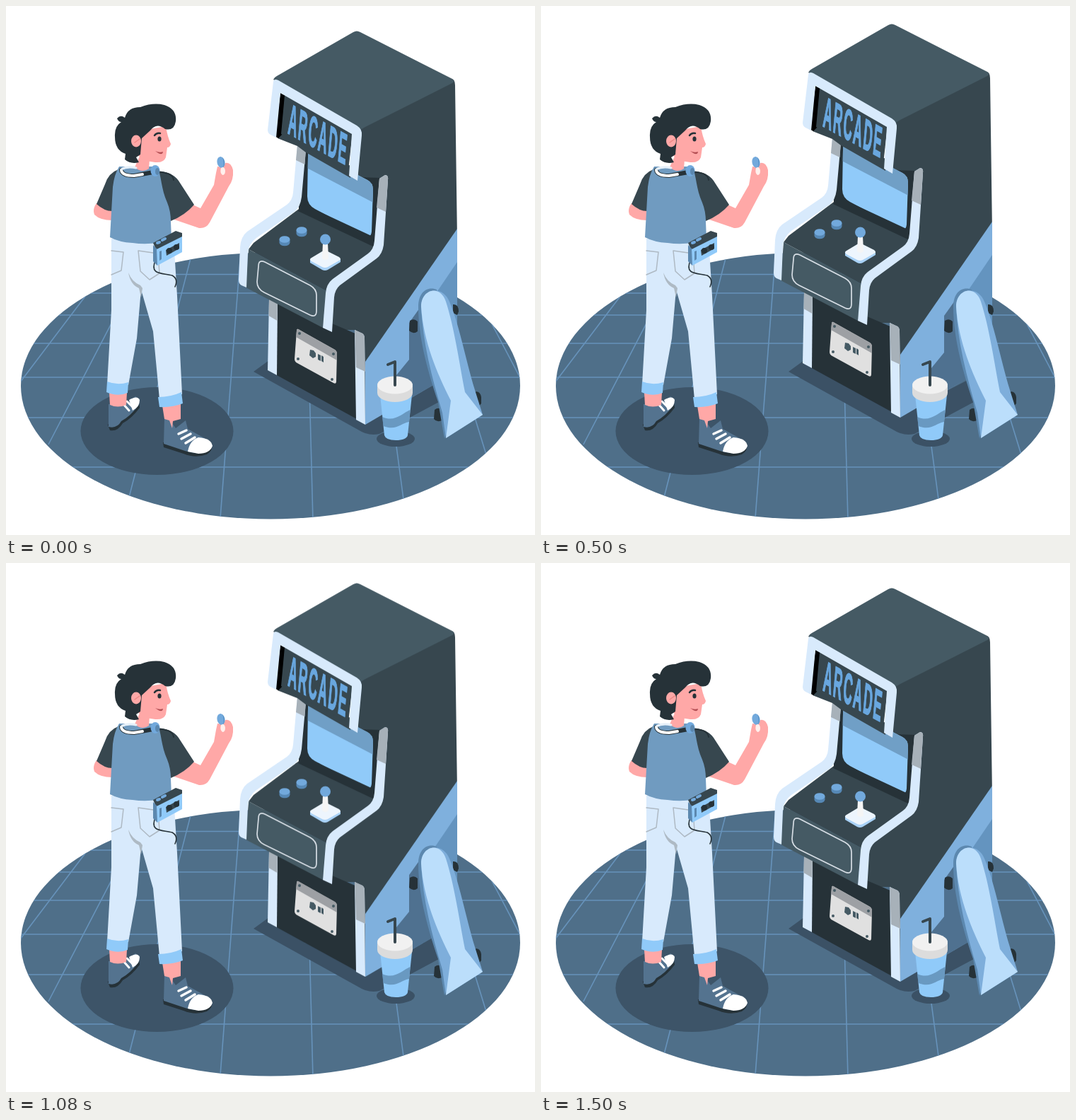
Write an HTML page without scripts that moves like this. It is 748x748 px and loops after 1540 ms.

```html
<!DOCTYPE html>
<html lang="en">
<head>
<meta charset="utf-8">
<title>Arcade</title>
<style>
  html, body { margin: 0; width: 100%; height: 100%; overflow: hidden; background: #fff; }
  svg { display: block; width: 100vw; height: 100vh; }
  .navy { fill: #263238; }
  .dark { fill: #37474f; }
  .slate { fill: #455a64; }
  .ice { fill: #d8eafc; }
  .sky { fill: #90caf9; }
  .blue { fill: #72a9dc; }
  .steel { fill: #5c88af; }
  .skin { fill: #ffa8a7; }
  .grey { fill: #a7b1b9; }
  .white { fill: #fff; }
  .line { fill: none; stroke-linecap: round; stroke-linejoin: round; }
  .grid { fill: none; stroke: #6793bb; stroke-width: 1.6; }
  .sign { font: 700 58px "Liberation Sans", Arial, sans-serif; letter-spacing: 6px; fill: #69a7df; stroke: #69a7df; stroke-width: 2; }
  .cabinet { animation: hover 1540ms linear infinite; }
  @keyframes hover {
    0% { transform: translateY(0); }
    46.25% { transform: translateY(-14.25px); }
    95% { transform: translateY(.75px); }
    97.4%, 100% { transform: translateY(0); }
  }
</style>
</head>
<body>
<svg viewBox="0 0 748 748" xmlns="http://www.w3.org/2000/svg">
  <defs>
    <clipPath id="floor"><ellipse cx="374" cy="537" rx="353" ry="188.500"/></clipPath>
    <clipPath id="screen"><path id="glass" d="M427 213Q427 203 435 207L511 246Q519 250 519 260L517 319Q516 329 508 325L437 287Q426 281 426 269Z"/></clipPath>
    <g id="button">
      <path fill="#5688b5" d="M-7.500 0V4.500A7.500 4.800 0 0 0 7.500 4.500V0Z"/>
      <ellipse class="blue" rx="7.500" ry="4.800"/>
    </g>
  </defs>

  <!-- Floor -->
  <g clip-path="url(#floor)">
    <path fill="#4f6f89" d="M0 340H748V748H0Z"/>
    <path class="grid" d="M0 379.500H748M0 406H748M0 437H748M0 477H748M0 525H748M0 582H748M0 652H748"/>
    <path class="grid" d="M190 370L60 620M120 400L20 532M261 357L170 710M332 345L303 724M424 345L434 728M515 345L563 705M590 345L690 670M640 360L745 560"/>
    <path fill="#3b5165" d="M350 517L372 501L508 578L640 510V545L528 605Q515 608 503 602Z"/>
    <ellipse cx="213.500" cy="601" rx="108" ry="62" fill="#3d5468"/>
    <ellipse cx="551" cy="612" rx="27" ry="11" fill="#3b5165"/>
  </g>

  <!-- Arcade machine -->
  <g class="cabinet">
    <path class="dark" d="M500 172L630 103Q635 104 635 112L638 330V516L508 592L495 585V458H460L448 455L465 388L520 345L528 243L497 247Z"/>
    <path fill="#7fb0dd" d="M638 315V516L508 592V503Z"/>
    <path fill="#6494bf" d="M638 362L602 415L596 540L638 516Z"/>
    <path fill="#4f7190" d="M590 420L570 448V500L552 522V566L622 526L608 432Z"/>
    <path class="slate" d="M378 104Q379 101 383 99L491 37Q496 34 501 37L631 103Q636 106 631 109L510 170Q502 174 498 178Z"/>

    <path class="navy" d="M382 415L496 464V584L381 521Z"/>
    <path class="ice" d="M372 415L384 421L383 522L370 515Z"/>
    <path class="grey" d="M372 414L384 420L383.500 445L371.500 438Z"/>
    <path class="ice" d="M493 458L504 463Q507 465 507 470L508 592L495 585Z"/>
    <path class="grey" d="M493 458L504 463Q507 465 507 470L508 517L495 511Z"/>

    <path fill="#e0e0e0" d="M411 459Q411 455 415 458L465 486Q468 488 468 492L467 531Q467 535 463 533L412 505Q408 503 408 499Z"/>
    <path fill="#9da0a4" d="M411 459Q411 455 415 458L465 486Q468 488 468 492V501L410 468Z"/>
    <g class="slate">
      <circle cx="415" cy="463" r="2"/><circle cx="463" cy="492" r="2"/>
      <circle cx="413" cy="499" r="2"/><circle cx="461" cy="528" r="2"/>
      <path d="M430 486L435 487L438 491V496L434 498L429 494ZM441 492L445 494V502L441 500ZM446 494L449 496V504L446 502Z"/>
    </g>

    <path class="navy" d="M413 200L497 242L530 243L521 336L414 288Z"/>
    <use href="#glass" class="sky"/>
    <path clip-path="url(#screen)" fill="#709fc6" d="M420 195H525V281L420 226Z"/>
    <path class="dark" d="M414 287L521 336L522 346L465 388L453 403L343 344L350 335Z"/>
    <path class="slate" d="M343 344L453 403L448 455L339 398Z"/>
    <path class="navy" d="M418 279L523 328L521 341L413 290Z"/>
    <path class="line" stroke="#d7dee5" stroke-width="1.700" d="M357 368Q357 358 366 362L430 395Q439 400 439 409V431Q439 441 430 437L365 405Q355 400 355 390Z"/>

    <path class="ice" d="M412 196L424 203L418 270Q416 285 408 291L354 328Q343 336 342 350L340 398L333 395Q329 393 329 387L331 341Q332 326 341 319L397 281Q405 275 406 264Z"/>
    <path class="grey" d="M412 196L424 203L422.500 224L410 218Z"/>
    <path class="ice" d="M528 244L536 239Q541 239 540 246L534 338Q532 351 524 357L472 395Q465 401 464 412L461 461L448 455L452 406Q453 393 462 386L512 350Q520 344 521 332Z"/>
    <path class="grey" d="M528 244L536 239Q541 239 540 246L537 291L524 285Z"/>

    <use href="#button" x="394" y="330"/>
    <use href="#button" x="418" y="317"/>
    <path fill="#a9d2f7" d="M430 358L473 358V362L455 373Q451 375 447 373L430 363Z"/>
    <path fill="#edf5fd" d="M432 356L447 347Q451 345 455 347L471 355Q475 358 471 360L455 369Q451 371 447 369L432 361Q428 358 432 356Z"/>
    <path fill="#f5f5f5" d="M448 335H455L456 357Q452 361 447 357Z"/>
    <circle class="blue" cx="451.500" cy="330" r="7.500"/>

    <path class="dark" d="M384 187L391 178L487 226V243L424 207L412 198Z"/>
    <path d="M388 123L396 127L391 181L385 187L380 184Z"/>
    <path class="dark" d="M394 126L490 180L484 232L389 181Z"/>
    <path class="ice" d="M378 107Q379 102 385 105L496 169Q504 174 503 183L497 247L485 240L489 181L388 123L382 186L374 182Q370 180 370 175Z"/>
    <text class="sign" transform="matrix(.295 .162 -.09 1.030 398 179.500)">ARCADE</text>
  </g>

  <!-- Skateboard -->
  <g>
    <path class="navy" d="M632 422Q640 421 640 432L638 437L632 434ZM571 445Q577 441 582 446V460Q576 465 570 459ZM606 571Q612 566 618 572V585Q610 590 605 584ZM662 546Q670 543 672 553V562Q668 568 662 565Z"/>
    <path class="steel" d="M583 426C583 399 601 397 609 401L640 535L620 612L611 560C594 510 583 465 583 426Z"/>
    <path fill="#7eaedb" d="M587 425C587 400 617 393 627 418C640 447 650 500 663 543L674 578L622 611L617 575C602 525 589 475 587 425Z"/>
    <path fill="#bbdefb" d="M587 425C587 400 614 393 622 418C634 455 641 505 649 546L674 578L622 611L629 558C610 520 590 475 587 425Z"/>
  </g>

  <!-- Drink -->
  <g>
    <path class="sky" d="M529 550H574L568 607Q566 614 551 614Q537 614 535 607Z"/>
    <path class="steel" d="M532 581C550 589 560 576 571.500 571L570 588C558 590 552 601 533.500 594Z" opacity=".75"/>
    <path fill="#dcdcdc" d="M525 537H575V547A25 13 0 0 1 525 547Z"/>
    <ellipse cx="550" cy="536" rx="25" ry="12.500" fill="#f1f1f1"/>
    <path class="line" stroke="#37474f" stroke-width="4" d="M550 536V503L540 507"/>
  </g>

  <!-- Shoes and ankles -->
  <g>
    <path class="navy" d="M144 592L188 560L189 568Q178 583 165 590Q158 602 147 600Z"/>
    <path fill="#54738f" d="M145 563L169 562L183 552Q189 556 188 564Q176 580 163 587Q157 598 145 595Z"/>
    <path class="white" d="M174 557Q186 550 189 557Q189 567 179 572Z"/>
    <path class="line" stroke="#fff" stroke-width="3" d="M166 563L174 572M171 559L179 567"/>
    <path class="skin" d="M146 547H171L170 564Q158 569 147 564Z"/>
    <path class="navy" d="M222 617L291 618Q293 629 284 634Q268 640 251 633L223 624Z"/>
    <path fill="#54738f" d="M224 583L230 583L240 597L254 586L257 598L286 614Q293 628 280 631Q266 634 253 629L223 619Z"/>
    <path class="white" d="M272 610Q290 611 292 622Q288 633 272 633L257 630Q260 614 272 610Z"/>
    <path class="line" stroke="#fff" stroke-width="3.500" d="M244 605L255 600M248 612L261 605M254 618L267 610"/>
    <path class="skin" d="M221 565L247 561V584L236 587L235 597L231 586L224 584Z"/>
  </g>

  <!-- Jeans -->
  <g>
    <path class="ice" d="M149 329H237L242 410L249 549L217 556L208 460L191 401L185 470L173 536L143 535L149 430Z"/>
    <path class="sky" d="M143 531Q158 537 173 532L172 547Q158 553 142 546ZM215 553Q233 553 248 546L250 562Q235 568 217 567Z"/>
    <path fill="#aebac4" d="M173 377Q178 390 190 395L193 399L191 412L188 399Q176 394 173 377Z"/>
    <path class="line" stroke="#aeb9c3" stroke-width="1.500" d="M149 346L166 348L163 374L149 380M187 346L190 375L203 387L217 378L215 350L187 346"/>
  </g>

  <!-- Arms and torso -->
  <g>
    <path class="skin" d="M128 279Q122 287 125 295Q133 303 150 303V283Z"/>
    <path class="skin" d="M235 296L264 281L275 286L294 253L297 236L299 227Q308 229 310 222Q318 220 321 232Q322 246 315 255L288 306Q283 315 273 314L235 301Z"/>
    <path class="dark" d="M159 231Q145 236 140 252L128 280Q139 290 150 290ZM212 233Q235 234 244 247L266 281Q253 296 233 304Z"/>
    <path fill="#709bc0" d="M160 227H214C220 240 219 258 228 278Q233 290 233 305L234 330Q207 339 179 335Q160 334 147 327L151 256Q153 238 160 227Z"/>
    <ellipse class="blue" cx="304" cy="221" rx="5.500" ry="8" transform="rotate(-12 304 221)"/>
    <path fill="#508abf" d="M306 213.500Q311 220 307 229Q309 221 306 213.500Z"/>
    <path fill="#fff0ed" d="M304 229Q309 226 310 233Q310 239 306 239Q302 236 304 229Z"/>
  </g>

  <!-- Head -->
  <g>
    <path class="skin" d="M191 208L203 217L202 230Q192 237 182 228Z"/>
    <path class="skin" d="M187 177L226 170Q228 184 233 195Q232 200 228 200L226 214Q223 222 211 221L198 219L186 211Z"/>
    <path class="navy" d="M157 159Q162 153 168 158Q172 143 190 143Q208 136 224 140Q242 146 240 163Q238 177 225 174Q213 164 204 176L192 187L190 210L184 214L188 221Q176 224 168 217L169 209Q154 204 154 185Q153 170 163 164Q159 164 157 159Z"/>
    <ellipse class="skin" cx="184" cy="191" rx="7" ry="8.500"/>
    <ellipse class="navy" cx="217" cy="188" rx="2.600" ry="3.600"/>
    <path class="line" stroke="#263238" stroke-width="2.500" d="M210 183Q213 179 218 180"/>
    <path fill="#b34e53" d="M211 205Q217 208 222 206Q221 213 211 205Z"/>
    <path class="line" stroke="#ed8986" stroke-width="1.500" d="M189 188L182 193"/>
  </g>

  <!-- Headphones and player -->
  <g class="line">
    <path stroke="#263238" stroke-width="6" d="M163 232Q164 240 181 240L208 235"/>
    <path stroke="#fff" stroke-width="4" d="M163 232Q164 240 181 240L193 238"/>
    <path stroke="#e6f0f9" stroke-width="3" d="M163 231Q172 226 184 229"/>
    <path stroke="#263238" stroke-width="2" d="M218 235Q236 236 237 246"/>
    <path stroke="#263238" stroke-width="1.600" d="M212 358C201 382 223 377 235 381Q244 386 239 397"/>
  </g>
  <ellipse class="blue" cx="211" cy="233" rx="6.500" ry="8"/>
  <ellipse class="steel" cx="214" cy="234" rx="3" ry="5"/>
  <path class="dark" d="M208 335L240 318L249 321V329L213 346Z"/>
  <path class="steel" d="M208 338L214 344V367L208 361Z"/>
  <path class="sky" d="M213 344L249 326V348L214 367Z"/>
  <path class="dark" d="M226 345L245 335V343L227 353Z"/>
  <g class="navy">
    <circle cx="231" cy="346" r="4"/><circle cx="241" cy="341" r="4"/>
  </g>
  <path class="steel" d="M217 347L220 346V358L217 360Z"/>
  <path class="line" stroke="#72a9dc" stroke-width="4" d="M214 335L217 334M221 331L225 329"/>
</svg>
</body>
</html>
```
